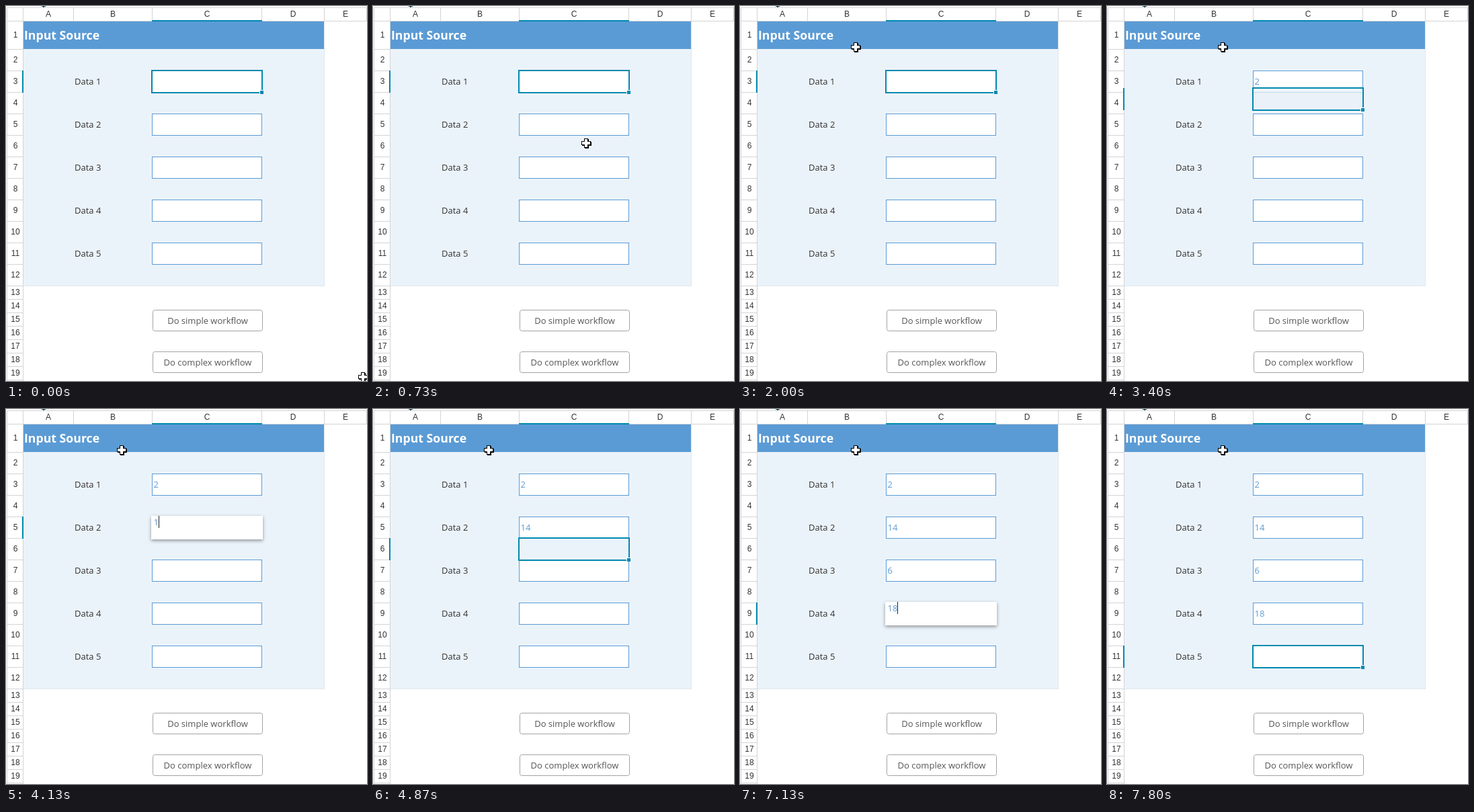
These frames come from a looping animation (537 by 558 pixels, 8000 ms). An HTML page with a canvas:

```html
<!DOCTYPE html>
<html lang="en">
<head>
<meta charset="utf-8">
<title>Spreadsheet input</title>
<style>
html, body { margin: 0; width: 100%; height: 100%; overflow: hidden; background: #fff; }
canvas { display: block; }
</style>
</head>
<body>
<canvas id="stage" width="537" height="558"></canvas>
<script>
const ctx = document.getElementById('stage').getContext('2d');
const LOOP = 8000;
const TEAL = '#0089ae', BLUE = '#5b9bd5', PANEL = '#ebf3fa', LINE = '#d4d4d4';
const HEAD = '12px "Liberation Sans", Arial, sans-serif';
const BODY = '13px "Open Sans", "Noto Sans", sans-serif';
const TITLE = 'bold 17.7px "Open Sans", "Noto Sans", sans-serif';

const colEdges = [25, 100, 217, 380, 473, 536];
const rowEdges = [22, 64];
while (rowEdges.length < 13) rowEdges.push(rowEdges.at(-1) + 32);
while (rowEdges.length < 20) rowEdges.push(rowEdges.at(-1) + 20);

// One entry per filled cell: editor opens, second digit typed, value committed.
const entries = [
  { value: '2', open: 2930, done: 3400 },
  { value: '14', open: 4130, next: 4400, done: 4730 },
  { value: '6', open: 5400, done: 5870 },
  { value: '18', open: 6600, next: 7130, done: 7530 }
];

// [time, selection offset from the first input cell]
const moves = [
  [0, 0],
  [3400, 26], [3470, 32], [3600, 64],
  [4730, 76], [4800, 90], [4870, 96], [5000, 128],
  [5870, 140], [5930, 154], [6000, 160], [6130, 180], [6200, 192],
  [7530, 204], [7600, 218], [7670, 224], [7730, 244], [7800, 256]
];

// Pointer waypoints: [tick, x, y]
const path = [
  [0, 531.5, 552.5], [13, 290.5, 160.5], [17, 262.5, 115.5], [18, 265.5, 116.5],
  [24, 265.5, 116.5], [30, 172.5, 61.5]
];

function rect(x, y, w, h, color) {
  ctx.fillStyle = color;
  ctx.fillRect(x, y, w, h);
}

function text(str, x, y, font, color, align = 'left') {
  ctx.font = font;
  ctx.fillStyle = color;
  ctx.textAlign = align;
  ctx.fillText(str, x, y);
}

function box(x, y, w, h, color) {
  ctx.strokeStyle = color;
  ctx.lineWidth = 1;
  ctx.strokeRect(x + .5, y + .5, w - 1, h - 1);
}

function button(label, y) {
  ctx.beginPath();
  ctx.roundRect(218.5, y + .5, 163, 31, 3);
  ctx.fillStyle = '#fff';
  ctx.fill();
  ctx.strokeStyle = '#a3a3a3';
  ctx.lineWidth = 1;
  ctx.stroke();
  text(label, 300, y + 21, BODY, '#555', 'center');
}

function drawHeaders() {
  rect(1, 2, 536, 1, LINE);
  rect(1, 2, 1, 556, LINE);
  rect(1, 22, 536, 1, LINE);
  rect(25, 2, 1, 556, LINE);
  colEdges.forEach((x, i) => {
    rect(x, 2, 1, 21, LINE);
    if (i) text('ABCDE'[i - 1], (colEdges[i - 1] + x) / 2 + .5, 16, HEAD, '#333', 'center');
  });
  rowEdges.forEach((y, i) => {
    rect(1, y, 25, 1, LINE);
    if (i) text(String(i), 14, Math.round((rowEdges[i - 1] + y) / 2) + 4, HEAD, '#333', 'center');
  });
  rect(217, 21, 164, 2, TEAL);
  rect(53, 0, 6, 1, '#1f4e57');
  rect(55, 1, 2, 1, '#1f4e57');
}

function drawSheet(t) {
  rect(26, 23, 448, 394, '#dfe8ef');
  rect(26, 23, 447, 393, PANEL);
  rect(26, 23, 447, 41, BLUE);
  text('Input Source', 27, 50, TITLE, '#fff');
  for (let i = 0; i < 5; i++) {
    const y = 96 + 64 * i, entry = entries[i];
    text('Data ' + (i + 1), 102, y + 21, BODY, '#333');
    rect(217, y, 164, 33, '#fff');
    box(217, y, 164, 33, BLUE);
    if (entry && t >= entry.done) text(entry.value, 219.5, y + 21, BODY, BLUE);
  }
  button('Do simple workflow', 452);
  button('Do complex workflow', 514);
}

function drawSelection(t) {
  const offset = moves.findLast(m => m[0] <= t)[1];
  const y = 95 + offset;
  if (offset % 32) rect(218, y + 2, 162, 31, 'rgba(235,241,250,.7)');
  rect(24, y + 1, 2, 33, TEAL);
  ctx.strokeStyle = TEAL;
  ctx.lineWidth = 2;
  ctx.strokeRect(217, y + 1, 164, 33);
  rect(377, y + 30, 6, 6, '#fff');
  rect(378, y + 31, 5, 5, TEAL);
}

function drawEditor(entry, y, t) {
  ctx.save();
  ctx.shadowColor = 'rgba(0,0,0,.4)';
  ctx.shadowBlur = 5;
  ctx.shadowOffsetY = 2;
  rect(216, y, 166, 35, '#fff');
  ctx.restore();
  const typed = t < entry.next ? entry.value[0] : entry.value;
  text(typed, 219.5, y + 14, BODY, BLUE);
  rect(Math.round(219.5 + ctx.measureText(typed).width), y, 1, 18, '#222');
}

function pointerAt(t) {
  const tick = Math.min(30, Math.floor(t * .015 + .06));
  const i = Math.max(1, path.findIndex(p => p[0] >= tick));
  const [t0, x0, y0] = path[i - 1], [t1, x1, y1] = path[i];
  const u = (tick - t0) / (t1 - t0);
  const e = .55 * u + .45 * u * u * (3 - 2 * u);
  return [x0 + (x1 - x0) * e, y0 + (y1 - y0) * e];
}

function plus(x, y, size, arm, color) {
  const gap = (size - arm) / 2;
  rect(x + gap, y, arm, size, color);
  rect(x, y + gap, size, arm, color);
}

function drawPointer(t) {
  const [x, y] = pointerAt(t).map(v => Math.round(v - 7.5));
  plus(x + 1, y + 1, 14, 6, '#000');
  plus(x, y, 14, 6, '#000');
  plus(x + 1, y + 1, 12, 4, '#fff');
}

function draw(t) {
  rect(0, 0, 537, 558, '#fff');
  drawHeaders();
  drawSheet(t);
  const i = entries.findIndex(e => t >= e.open && t < e.done);
  drawSelection(t);
  if (i >= 0) {
    // The fill handle is hidden while a cell is being edited.
    const y = 95 + 64 * i;
    rect(382, y + 30, 1, 6, PANEL);
    rect(377, y + 35, 6, 1, PANEL);
    drawEditor(entries[i], y, t);
  }
  drawPointer(t);
}

const start = performance.now();
function frame() {
  draw((performance.now() - start) % LOOP);
  requestAnimationFrame(frame);
}
frame();
</script>
</body>
</html>
```
